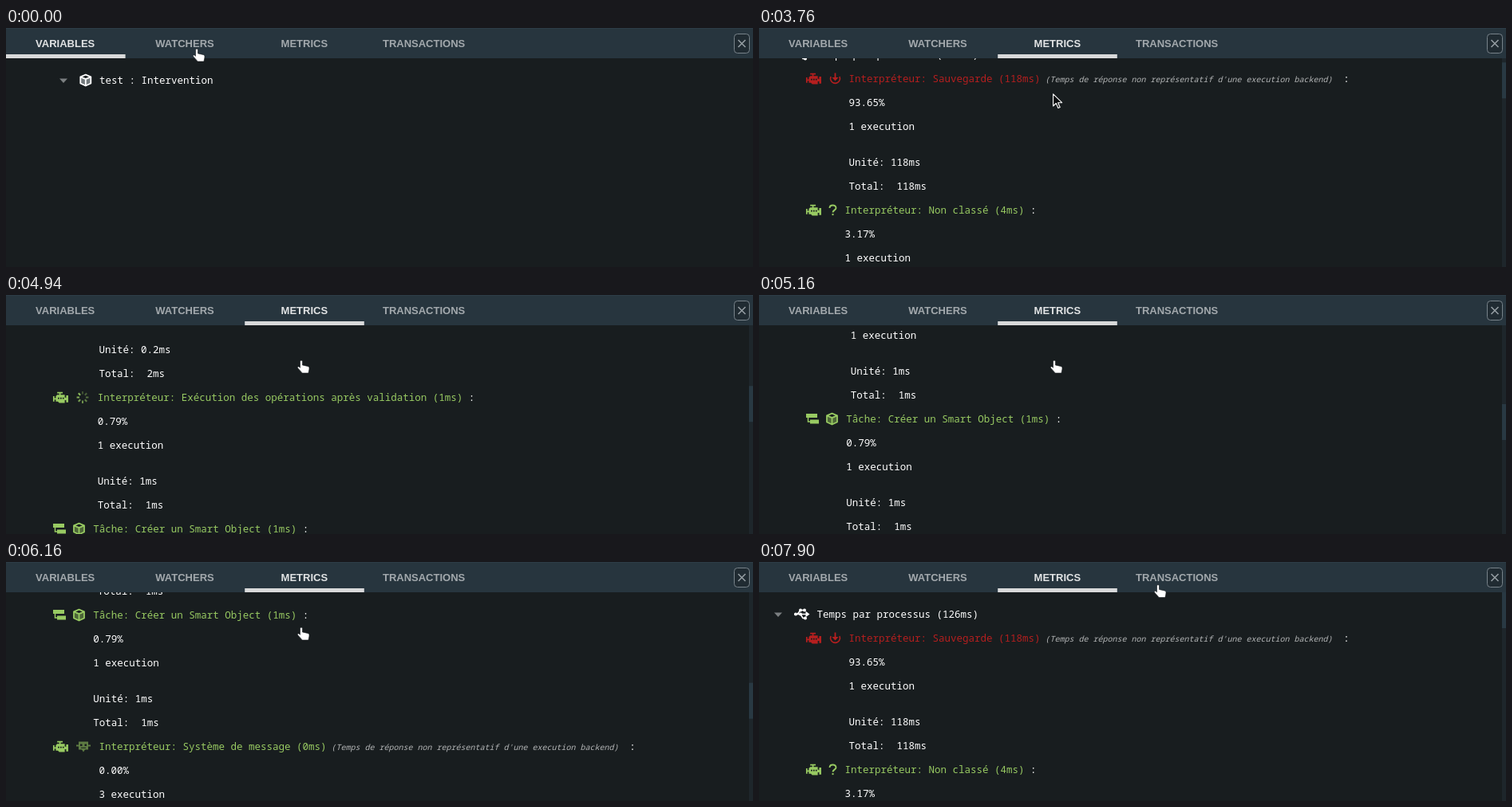
An HTML page that plays this animation: 936 px wide and 300 px high, repeating every 8 s.

```html
<!DOCTYPE html>
<html lang="fr">
<head>
<meta charset="utf-8">
<title>Metrics panel</title>
<style>
html, body { margin: 0; width: 100%; height: 100%; overflow: hidden; background: #181d1f; }
svg { display: block; }
text { white-space: pre; }
.mono { font: 12.5px "Noto Sans Mono", "DejaVu Sans Mono", monospace; fill: #fff; }
.note { font: italic 10px "Noto Sans Mono", "DejaVu Sans Mono", monospace; fill: #b4b6b7; }
.tab { font: bold 13px "Liberation Sans", Arial, sans-serif; text-anchor: middle; }
.badge { font: 10px "Noto Sans", sans-serif; fill: #d5d8d9; text-anchor: middle; }
</style>
</head>
<body>
<svg id="stage" width="936" height="300" viewBox="0 0 936 300">
  <rect width="936" height="300" fill="#181d1f"/>
  <g id="variables"></g>
  <g id="watchers"></g>
  <g id="metrics">
    <g id="list"></g>
    <rect x="931" y="38" width="5" height="262" fill="#1e262b"/>
    <rect id="thumb" x="931" y="38" width="5" height="45" fill="#293943"/>
  </g>
  <rect width="936" height="38" fill="#27353e"/>
  <rect width="936" height="1" fill="#2d3d47"/>
  <g id="tabs"></g>
  <rect id="underline" y="33" width="149.6" height="5" fill="#d8d9da"/>
  <rect x="912.5" y="7.5" width="19" height="24" rx="4" fill="#202b32" stroke="#78838a"/>
  <path d="M917.5 15l9 9m0-9l-9 9" stroke="#949da2" stroke-width="1.6" fill="none"/>
  <path id="hand" fill="#fff" stroke="#11161a" stroke-width=".6" d="M3.5 1.5a1.5 1.5 0 0 1 3 0V6l6.4 1.4c1.4.3 2.1 1 2.1 2.3 0 2.8-.8 4.1-1 6.3H6C5 14 1.6 11 .5 9.4-.2 8.2 1.3 7.4 2.4 8.3l1.1 1z"/>
  <path id="arrow" fill="#0c0e0f" stroke="#fff" stroke-width="1.1" stroke-linejoin="round" d="M.6.8V16l3.7-3.5 2.6 6 2.3-1-2.6-5.8h5z"/>
</svg>
<script>
const LOOP = 8000, CHAR = 7.5, ROW = 165, TAB = 149.6;
const RED = '#b51f1f', GREEN = '#98ca62', WHITE = '#fff';
const $ = id => document.getElementById(id);

const text = (x, y, str, cls = 'mono', fill) =>
  `<text x="${x}" y="${y}" class="${cls}"${fill ? ` style="fill:${fill}"` : ''}>${str}</text>`;
const line = (d, color, width = 2) =>
  `<path d="${d}" fill="none" stroke="${color}" stroke-width="${width}"/>`;
const shape = (d, color) => `<path d="${d}" fill="${color}"/>`;
const at = (x, y, body) => `<g transform="translate(${x} ${y})">${body}</g>`;

// Icons are placed by their left edge and vertical centre.
const cube = (x, y, color, face) => at(x, y,
  shape('M1 -4L7.5 -1V7L1 4zM14 -4L7.5 -1V7L14 4z', face) +
  `<path d="M7.5 -6.8L14 -4.2V4L7.5 7L1 4V-4.2zM1 -4.2L7.5 -1.4L14 -4.2M7.5 -1.4V7" fill="none" stroke="${color}" stroke-width="1.8" stroke-linejoin="round"/>`);

const engine = (y, color) =>
  `<g transform="translate(58.1 ${y - 10.2}) scale(.864)">` +
  shape('M7 4V6H10V8H7L5 10V13H3V10H1V18H3V15H5V18H8L10 20H18V16H20V19H23V9H20V12H18V8H12V6H15V4z', color) +
  shape('M8 12h2v2H8zm3.4 0h2v2h-2zm3.4 0h2v2h-2z', '#181d1f') + '</g>';

const task = (y, color) => at(59, y,
  shape('M0 -6.5H14V-1.5H0zM5 1H16V6H5z', color) + line('M2.5 -2V3.5H6', color, 1.5));

const spokes = (x, y, color) => {
  let out = '';
  for (let i = 0; i < 8; i++)
    out += `<path d="M0 -4V-7.4" stroke="${color}" stroke-width="2" opacity="${.3 + i * .09}" transform="rotate(${i * 45})"/>`;
  return at(x, y, out);
};

const save = (y, color) => at(95.5, y,
  line('M0 -7V1', color, 1.8) + shape('M-4 -1.5H4L0 3z', color) +
  line('M-5.5 -2.5A6 6 0 1 0 5.5 -2.5', color, 1.6));

const help = (y, color) => at(92.5, y,
  line('M-4 -2.5C-4 -7.2 4 -7.2 4 -2.5C4 0 0 .3 0 3', color, 1.9) + shape('M-1 4.6h2v2h-2z', color));

const gear = (y, color) => at(97, y,
  `<circle r="4" fill="none" stroke="${color}" stroke-width="2.2"/>` +
  `<circle r="6.2" fill="none" stroke="${color}" stroke-width="2" stroke-dasharray="2.44 2.43"/>`);

const bot = (y, color) => `<g opacity=".55">` + at(97, y,
  shape('M-6 -6H6V4H2L0 7L-2 4H-6z', color) +
  line('M-9 -1H-6M6 -1H9', color, 2) +
  shape('M-4 -3h2.5v2.5H-4zm5.5 0H4v2.5H1.5zM-3 1.3h6v1h-6z', '#181d1f')) + '</g>';

const items = [
  { x: 112.5, name: 'Interpréteur: Sauvegarde', total: '118ms', pct: '93.65', runs: 1, icon: save, note: true, color: RED },
  { x: 107.5, name: 'Interpréteur: Non classé', total: '4ms', pct: '3.17', runs: 1, icon: help },
  { x: 116.5, name: 'Interpréteur: Calcul de formule', total: '2ms', unit: '0.2ms', pct: '1.59', runs: 10, icon: gear },
  { x: 114.8, name: 'Interpréteur: Exécution des opérations après validation', total: '1ms', pct: '0.79', runs: 1, icon: (y, c) => spokes(96, y, c) },
  { x: 109.3, name: 'Tâche: Créer un Smart Object', total: '1ms', pct: '0.79', runs: 1, lead: task, icon: (y, c) => cube(84, y, c, '#4d6638') },
  { x: 116.5, name: 'Interpréteur: Système de message', total: '0ms', pct: '0.00', runs: 3, icon: bot, note: true },
  { x: 116.5, name: 'Interpréteur: Initialisation', total: '0ms', pct: '0.00', runs: 1, icon: gear }
];

function itemMarkup(item, i) {
  const { x, name, total, unit = total, pct, runs, lead = engine, icon, note, color = GREEN } = item;
  const y = 100 + ROW * i;
  const title = `${name} (${total})`;
  const end = x + title.length * CHAR;
  return lead(y - 4.5, color) + icon(y - 4.5, color) +
    text(x, y, title, 'mono', color) +
    (note ? text(end + 6, y, "(Temps de réponse non représentatif d'une execution backend)", 'note') : '') +
    text(end + (note ? 379.8 : CHAR), y, ':') +
    text(x, y + 30, pct + '%') +
    text(x, y + 60, runs + ' execution') +
    text(x, y + 105, 'Unité: ' + unit) +
    text(x, y + 135, 'Total:  ' + total);
}

const flow = at(44, 65.5,
  line('M0 0H17M4 0L8 -5H13M8 0L11 5H14', WHITE, 1.6) + shape('M14.5 -3.8L19.5 0L14.5 3.8z', WHITE) +
  [[2, 0], [8, -5], [13, -5], [8, 0], [14, 5]].map(([x, y]) => `<circle cx="${x}" cy="${y}" r="2" fill="#fff"/>`).join(''));
const openMark = x => shape(`M${x} 63.5h10l-5 5.5z`, '#7b7f81');

$('variables').innerHTML = openMark(67) + cube(92.3, 65.5, WHITE, '#737a7d') + text(117, 70, 'test : Intervention');

$('watchers').innerHTML =
  shape('M43 57L57.5 63L54.5 69L40 63z', '#f2b544') +
  line('M47 66L45 70.5H41M41 68V74', '#8b6a2e', 1.5) +
  line('M51 68.5L55 70', '#b98a35', 1.5) +
  '<circle cx="61.5" cy="75.5" r="7.5" fill="#2c3438"/>' + text(61.5, 79.2, '0', 'badge') +
  shape('M69 60.5L75 65.5L69 70.5z', '#7b7f81') +
  cube(92.3, 65.5, WHITE, '#737a7d') + text(117, 70, ' : Intervention');

$('list').innerHTML = openMark(19) + flow + text(72.5, 70, 'Temps par processus (126ms)') +
  items.map(itemMarkup).join('');

$('tabs').innerHTML = ['VARIABLES', 'WATCHERS', 'METRICS', 'TRANSACTIONS']
  .map((name, i) => text(74.2 + 149.8 * i, 24, name, 'tab')).join('');

const panels = ['variables', 'watchers', 'metrics'].map($);
const labels = [...$('tabs').children];

// Each wheel move: start, end, from, to, ease-out power.
const wheel = [
  [3740, 4000, 0, 179, 2.5],
  [4780, 4940, 179, 462, 1],
  [4940, 5080, 462, 600, 2],
  [5220, 5380, 600, 764, 1],
  [5380, 5600, 764, 890, 2],
  [6040, 6540, 890, 53, 1],
  [6540, 6600, 53, 0, 1.5]
];

function scrollAt(t) {
  let pos = 0;
  for (const [start, end, from, to, power] of wheel) {
    if (t < start) break;
    const u = Math.min(1, (t - start) / (end - start));
    pos = from + (to - from) * (1 - (1 - u) ** power);
  }
  return Math.round(pos);
}

// Pointer stops: time, x, y, kind.
const stops = [
  [0, 234, 26, 'hand'], [1520, 238, 24, 'hand'], [1600, 274, 20, 'hand'],
  [1700, 338, 20, 'hand'], [1800, 378, 23, 'hand'], [3000, 377, 34, 'hand'],
  [3060, 372, 60, 'arrow'], [3120, 368, 82, 'arrow'], [4500, 365, 82, 'hand'],
  [7080, 368, 85, 'hand']
];

function pointerAt(t) {
  if (t >= 7500) {
    const u = Math.min(7, Math.floor((t - 7500) / 66) + 1) / 7;
    const e = u * u * (3 - 2 * u);
    return [t, 368 + 127 * e, 85 - 56.5 * e, 'hand'];
  }
  return stops.filter(s => s[0] <= t).pop();
}

function draw(time) {
  const t = Math.floor((time % LOOP) / 20) * 20;
  const active = t < 700 ? 0 : t < 2360 ? 1 : 2;
  panels.forEach((p, i) => p.setAttribute('display', i === active ? 'inline' : 'none'));
  labels.forEach((l, i) => l.style.fill = i === active ? '#e2e4e5' : '#a3a9ad');
  $('underline').setAttribute('x', TAB * active);

  const pos = scrollAt(t);
  $('list').setAttribute('transform', `translate(0 ${-pos})`);
  $('thumb').setAttribute('y', 38 + pos * .165);

  const [, x, y, kind] = pointerAt(t);
  for (const id of ['hand', 'arrow']) {
    $(id).setAttribute('display', id === kind ? 'inline' : 'none');
    $(id).setAttribute('transform', `translate(${x} ${y})`);
  }
}

const begin = performance.now();
function tick() {
  draw(performance.now() - begin);
  requestAnimationFrame(tick);
}
tick();
</script>
</body>
</html>
```
